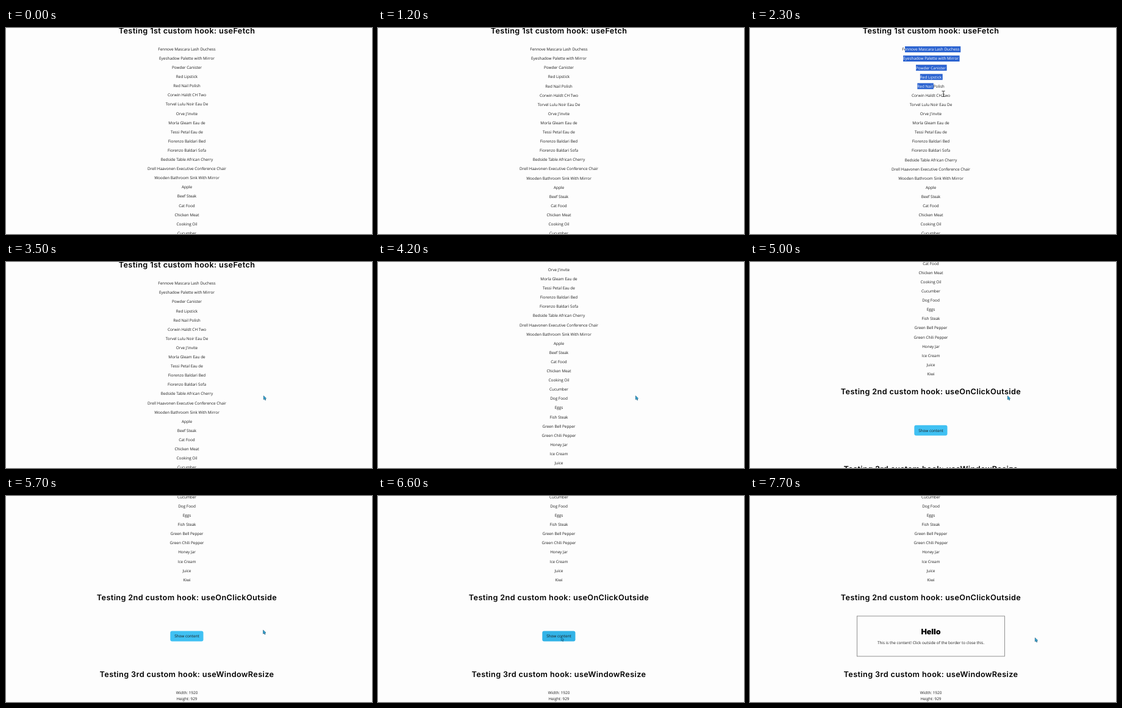
Write an HTML page that moves like this. It is 600 px wide and 338 px high and loops after 8 s.

```html
<!DOCTYPE html>
<html lang="en">
<head>
<meta charset="utf-8">
<title>Custom hooks</title>
<style>
  html, body { margin: 0; height: 100%; overflow: hidden; background: #fdfdfd; }
  svg { display: block; width: 100vw; height: 100vh; }
  text { font: 6.4px "Open Sans", "Noto Sans", sans-serif; fill: #1c1c1c; text-anchor: middle; text-rendering: geometricPrecision; }
  .title { font: 600 12.7px Inter, sans-serif; letter-spacing: .37px; fill: #000; }
  .hello { font: 900 12.5px Inter, sans-serif; fill: #000; }
  #marked rect { fill: #2a62d0; }
  #marked text { fill: #fff; }
</style>
</head>
<body>
<svg viewBox="0 0 600 338">
  <clipPath id="range"><path id="rangePath"/></clipPath>
  <g id="page">
    <text class="title" x="296.5" y="9.4">Testing 1st custom hook: useFetch</text>
    <g id="list"></g>
    <g id="marked" clip-path="url(#range)"></g>
    <text class="title" x="296.5" y="506.4">Testing 2nd custom hook: useOnClickOutside</text>
    <g id="button">
      <rect id="face" x="269.3" y="557" width="54.2" height="17" rx="3"/>
      <text x="296.5" y="567.8">Show content</text>
    </g>
    <g id="panel">
      <rect x="175.5" y="532.5" width="242" height="66" fill="none" stroke="#777" stroke-width=".8"/>
      <text class="hello" x="296.5" y="562.2">Hello</text>
      <text x="296.5" y="578.8">This is the content! Click outside of the border to close this.</text>
    </g>
    <text class="title" x="296.5" y="632.9">Testing 3rd custom hook: useWindowResize</text>
    <text x="296.5" y="660.7">Width: 1920</text>
    <text x="296.5" y="670.5">Height: 929</text>
  </g>
  <path id="beam" d="M-2.5-4.5H-.6L0-4 .6-4.5H2.5M0-4V4M-2.5 4.5H-.6L0 4 .6 4.5H2.5" fill="none" stroke="#222" stroke-width=".9"/>
  <path id="arrow" d="M.3.3V6.5L1.8 5.3 2.8 7.5 3.9 7 2.9 4.8 4.7 4.6Z" fill="#2ba6d8" stroke="#17506e" stroke-width=".6"/>
</svg>
<script>
const LOOP = 8000, MID = 296.5, TOP = 35, STEP = 15.1, ANCHOR = 254;
const items = ["Fennove Mascara Lash Duchess", "Eyeshadow Palette with Mirror", "Powder Canister",
  "Red Lipstick", "Red Nail Polish", "Corwin Haldt CH Two", "Torvel Lulu Noir Eau De", "Orve J'invite",
  "Morla Gleam Eau de", "Tessi Petal Eau de", "Fiorenzo Baldari Bed", "Fiorenzo Baldari Sofa",
  "Bedside Table African Cherry", "Drell Haavonen Executive Conference Chair",
  "Wooden Bathroom Sink With Mirror", "Apple", "Beef Steak", "Cat Food", "Chicken Meat", "Cooking Oil",
  "Cucumber", "Dog Food", "Eggs", "Fish Steak", "Green Bell Pepper", "Green Chili Pepper", "Honey Jar",
  "Ice Cream", "Juice", "Kiwi"];

// Keys: [time, value, ...]
const scrollKeys = [[0, .4], [800, .4], [1500, 0], [3500, 0], [4000, 128], [4200, 128], [4500, 250],
  [4700, 250], [5200, 310.3], [5500, 310.3], [5690, 335.5]];
const cursorKeys = [[1700, 254, 36], [2300, 317, 108], [2500, 322, 113], [2700, 322, 113],
  [3400, 422, 219.3], [5000, 422, 219.3], [5700, 421.3, 219.7], [5800, 421.3, 219.7], [6350, 300, 231],
  [6900, 300, 231], [7650, 467, 232.4]];
const hoverKeys = [[6400, 0], [6600, 1]];

const $ = id => document.getElementById(id);

function add(parent, tag, attrs, text = "") {
  const el = document.createElementNS("http://www.w3.org/2000/svg", tag);
  for (const k in attrs) el.setAttribute(k, attrs[k]);
  el.textContent = text;
  return parent.appendChild(el);
}

function at(keys, t) {
  const i = keys.findIndex(k => k[0] > t);
  if (i < 0) return keys[keys.length - 1].slice(1);
  if (i === 0) return keys[0].slice(1);
  const a = keys[i - 1], b = keys[i], s = (t - a[0]) / (b[0] - a[0]), e = s * s * (3 - 2 * s);
  return a.slice(1).map((v, j) => v + (b[j + 1] - v) * e);
}

const show = (el, on) => el.setAttribute("visibility", on ? "visible" : "hidden");
const move = (el, x, y) => el.setAttribute("transform", `translate(${x} ${y})`);

items.forEach((name, i) => {
  const y = TOP + i * STEP, pos = { x: MID, y: y + 2.3 };
  const w = add($("list"), "text", pos, name).getComputedTextLength();
  if (i > 7) return;
  add($("marked"), "rect", { x: MID - w / 2, y: y - 4.9, width: w + 1.6, height: 9.8 });
  add($("marked"), "text", pos, name);
});

function select(x, y) {
  const top = TOP - STEP / 2, row = Math.max(0, Math.floor((y - top) / STEP)), end = top + row * STEP;
  $("rangePath").setAttribute("d", row
    ? `M${ANCHOR} ${top}H600V${end}H${x}V${end + STEP}H0V${top + STEP}H${ANCHOR}Z`
    : `M${ANCHOR} ${top}H${x}V${top + STEP}H${ANCHOR}Z`);
}

function draw(t) {
  const [x, y] = at(cursorKeys, t), [hover] = at(hoverKeys, t), open = t >= 6900;
  move($("page"), 0, -at(scrollKeys, t)[0]);
  select(...at(cursorKeys, t - 200));
  show($("marked"), t >= 1700 && t < 2700);
  show($("beam"), t >= 1700 && t < 2800);
  show($("arrow"), t >= 2800);
  move($("beam"), x, y);
  move($("arrow"), x, y);
  show($("button"), !open);
  show($("panel"), open);
  $("face").setAttribute("fill", `rgb(${64 - 14 * hover},${193 - 14 * hover},${243 - 12 * hover})`);
}

function frame() {
  draw(performance.now() % LOOP);
  requestAnimationFrame(frame);
}
frame();
</script>
</body>
</html>
```
